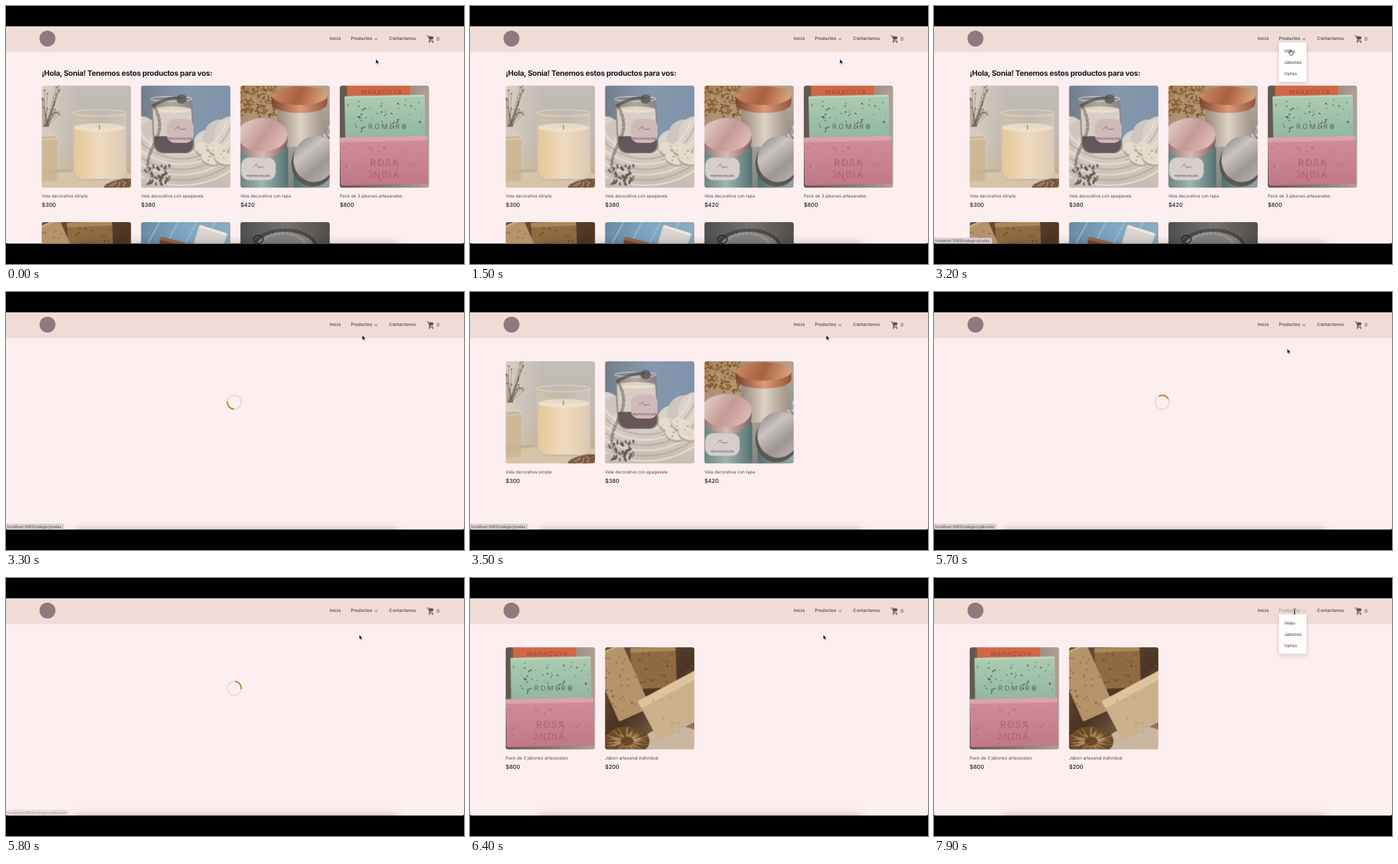
An HTML page with a canvas that plays this animation: 690x388 px, repeating every 8000 ms.

```html
<!DOCTYPE html>
<html lang="es">
<head>
<meta charset="utf-8">
<title>Tienda artesanal</title>
<style>
html, body { margin: 0; width: 100%; height: 100%; overflow: hidden; background: #000; }
canvas { display: block; width: 690px; height: 388px; }
</style>
</head>
<body>
<canvas id="stage"></canvas>
<script>
const W = 690, H = 388, LOOP = 8000, STEP = 100, TAU = Math.PI * 2;
const TOP = 30.6, BOTTOM = 357.5;
const CARD_W = 134.5, CARD_H = 153.5, PAD = 4;
const dpr = window.devicePixelRatio || 1;
const stage = document.getElementById('stage');
let c = context(stage, W, H);

function context(canvas, w, h) {
  canvas.width = Math.ceil(w * dpr);
  canvas.height = Math.ceil(h * dpr);
  const ctx = canvas.getContext('2d');
  ctx.scale(dpr, dpr);
  ctx.textRendering = 'geometricPrecision';
  return ctx;
}

// Drawing helpers
function rect(x, y, w, h, fill, r = 0) {
  c.fillStyle = fill;
  c.beginPath();
  c.roundRect(x, y, w, h, r);
  c.fill();
}
function oval(x, y, rx, ry, fill, rot = 0) {
  c.fillStyle = fill;
  c.beginPath();
  c.ellipse(x, y, rx, ry, rot, 0, TAU);
  c.fill();
}
function ring(x, y, rx, ry, color, width, from = 0, to = TAU) {
  c.strokeStyle = color;
  c.lineWidth = width;
  c.beginPath();
  c.ellipse(x, y, rx, ry, 0, from, to);
  c.stroke();
}
function line(color, width, ...pts) {
  c.beginPath();
  for (let i = 0; i < pts.length; i += 2) c.lineTo(pts[i], pts[i + 1]);
  c.strokeStyle = color;
  c.lineWidth = width;
  c.stroke();
}
function fade(x0, y0, x1, y1, ...colors) {
  const g = c.createLinearGradient(x0, y0, x1, y1);
  colors.forEach((col, i) => g.addColorStop(i / (colors.length - 1), col));
  return g;
}
const across = (x, w, ...colors) => fade(x, 0, x + w, 0, ...colors);
const down = (y, h, ...colors) => fade(0, y, 0, y + h, ...colors);

function text(s, x, y, size, weight, color, spacing = 0, align = 'left') {
  c.font = `${weight} ${size}px Inter, "Open Sans", sans-serif`;
  c.letterSpacing = spacing + 'px';
  c.textAlign = align;
  c.fillStyle = color;
  c.fillText(s, x, y);
}
function random(seed) {
  return () => (seed = (seed * 16807) % 2147483647) / 2147483647;
}
function specks(seed, n, x, y, w, h, color, size) {
  const r = random(seed);
  for (let i = 0; i < n; i++) {
    oval(x + r() * w, y + r() * h, size * (0.4 + r()), size * (0.3 + r() * 0.5), color, r() * 3);
  }
}

// Parts of the product pictures
function backdrop(fill) {
  rect(-PAD, -PAD, CARD_W + 2 * PAD, CARD_H + 2 * PAD, fill);
}
function slab(x, y, w, h, rot, front, edge, depth) {
  c.save();
  c.translate(x, y);
  c.rotate(rot);
  rect(0, 0, w, h, front, 3);
  rect(0, 0, w, depth, edge, 2);
  c.restore();
}
function glass(x, y, w, h, level, air, wax) {
  rect(x, y, w, h, air, [2, 2, 14, 14]);
  rect(x + 2, y + level, w - 4, h - level - 3, wax, [2, 2, 13, 13]);
  oval(x + w / 2, y + level, w / 2 - 2, w * 0.08, 'rgba(240,228,210,.75)');
  ring(x + w / 2, y, w / 2, w * 0.06, '#e2dcd3', 1);
}
function lid(x, y, rx, ry, depth, rim, face) {
  oval(x, y + depth, rx, ry, rim);
  rect(x - rx, y, rx * 2, depth, rim);
  oval(x, y, rx, ry, face);
}
function label(x, y, w, h, color) {
  rect(x - w / 2, y - h / 2, w, h, color, 12);
  line('#6f6068', 0.8, x - 8, y - 2, x - 3, y - 7, x, y - 2, x + 8, y - 3);
  text('FRUTOS ROJOS', x, y + h / 2 - 5, 4, 700, '#5c4b53', 0.4, 'center');
}
function chain(color, n, place) {
  for (let i = 0; i <= n; i++) {
    const [x, y] = place(i / n);
    ring(x, y, i % 2 ? 1.4 : 2.2, i % 2 ? 2.2 : 1.5, color, 0.9);
  }
}

function candle() {
  backdrop(down(0, CARD_H, '#c3bdb8', '#c2b9b0', '#c4ab8d'));
  rect(-PAD, -PAD, 60, 130, across(0, 56, 'rgba(221,212,198,.8)', 'rgba(221,212,198,0)'));
  oval(75, 148, 95, 20, '#d6c4aa');
  const r = random(41);
  for (let i = 0; i < 22; i++) {
    const x = r() * 27, y = r() * 48;
    line('rgba(91,76,58,.6)', 0.7, 2 + i * 0.4, 62, x, y);
    oval(x, y, 1.7, 0.9, '#75644e', r() * 3);
  }
  rect(-5, 76, 28, 68, 'rgba(203,180,143,.8)', 5);
  ring(9, 77, 14, 4, '#e7dccb', 0.8);
  glass(47, 41, 81, 102, 22, across(47, 81, '#cfc1ae', '#c3b9ae', '#cfc5ba'),
    across(47, 81, '#e5c797', '#eedbbf', '#dcc9b2'));
  line('#675242', 0.9, 87, 66, 87, 59);
  oval(118, 149, 25, 8, '#735440', -0.2);
  specks(7, 34, 96, 142, 40, 13, '#a47d5d', 2.2);
}

function jar() {
  backdrop(across(0, CARD_W, '#737f8b', '#8698ad', '#8093ab'));
  for (let i = 0; i < 9; i++) oval(i * 17, 98 - 22 * Math.cos(i * 0.8), 26, 30, i % 2 ? '#cfc7bf' : '#d9d2c9');
  rect(-PAD, 98, CARD_W + 2 * PAD, 60, down(98, 55, '#d6cec5', '#c8bdb1'));
  for (let i = 0; i < 7; i++) {
    ring(60, 40, 70 + i * 9, 62 + i * 8, i % 2 ? 'rgba(168,156,147,.5)' : 'rgba(237,230,221,.7)', 2.5, 0.2, 2.9);
  }
  c.save();
  c.transform(1, 0, 0.05, 1, 0, 0);
  glass(14, 20, 62, 82, 16, across(14, 62, '#8b8885', '#b0a8a2', '#878186'), '#d8cdc3');
  rect(16, 76, 58, 25, '#66585a', [0, 0, 14, 14]);
  c.restore();
  label(59, 68, 40, 36, '#cfbab9');
  oval(61, 20, 8, 7, '#68635f');
  chain('#4f4b49', 18, t => [58 - 40 * t, 18 + 12 * t * t]);
  chain('#595350', 26, t => [19 + 9 * Math.sin(t * 5), 29 + 96 * t]);
  for (let i = 0; i < 4; i++) {
    const x = 95 + i * 10, y = 95 + 14 * (i % 2);
    oval(x, y + 2, 16, 10, '#b7a997', 0.3);
    oval(x, y, 15, 9, '#e6dccd', 0.3);
  }
  specks(18, 16, 86, 88, 43, 26, '#9f8c73', 1.2);
  specks(25, 44, 7, 120, 40, 28, '#665e58', 2.8);
  specks(13, 22, 7, 120, 39, 28, '#c5bbad', 1.8);
}

function lids() {
  backdrop(fade(0, 0, CARD_W, CARD_H, '#a3845f', '#b3a69b', '#5c7475'));
  specks(31, 160, -3, -3, 56, 50, '#855b31', 2.6);
  specks(77, 160, -3, -3, 55, 48, '#bf9560', 1.8);
  specks(55, 70, 85, 60, 50, 40, '#d2c9c0', 2.4);
  rect(55, 30, 70, 62, across(55, 70, '#97897c', '#ddd2c5', '#a5958b'), 12);
  lid(89, 15, 42, 14, 12, across(48, 84, '#7d472f', '#dc9b77', '#8f5439'),
    fade(50, 0, 128, 28, '#c88a68', '#a8623f', '#e0a682'));
  rect(-8, 85, 80, 75, across(-8, 80, '#5f7b77', '#a3b5af', '#547471'), 12);
  label(27, 125, 52, 34, '#d5cecb');
  lid(33, 74, 38, 25, 10, across(-5, 76, '#8c6a6a', '#d9bab3', '#7f6261'),
    fade(0, 50, 70, 98, '#e6cfcb', '#c49b97', '#e4c4bd'));
  rect(80, 120, 62, 40, across(80, 55, '#54706f', '#98a9a7'), 12);
  oval(110, 116, 33, 36, '#5c5654', 0.25);
  oval(112, 110, 32, 35, fade(84, 78, 136, 142, '#8b8685', '#cbc4c1', '#9c9695', '#bdb5b2'), 0.25);
}

function pack() {
  backdrop(across(0, CARD_W, '#62574f', '#85786f', '#b09f95'));
  slab(11, -6, 95, 26, 0.01, '#cf6847', '#cf6847', 5);
  text('MARACUYA', 63, 13, 9.5, 400, '#a6452c', 1.1, 'center');
  slab(7, 16, 121, 70, -0.02, down(0, 65, '#abccb2', '#93b7a0'), '#bcd6c1', 3);
  specks(9, 44, 12, 20, 114, 50, '#55564a', 1.5);
  text('ROMERO', 73, 64.5, 10.5, 400, '#596a59', 2.5, 'center');
  slab(0, 78, 132, 72, -0.02, down(0, 72, '#d18d9b', '#c27987'), '#dba3ad', 7);
  specks(62, 20, 6, 84, 120, 58, '#a05c6c', 1.3);
  text('ROSA', 68, 121, 14, 300, '#a5566a', 1.8, 'center');
  text('INDIA', 68, 139, 13.5, 300, '#a5566a', 1.8, 'center');
}

function bars() {
  backdrop(fade(0, 0, CARD_W, CARD_H, '#705038', '#4c3525', '#a68d73'));
  oval(105, 148, 50, 30, '#c8b6a0');
  slab(38, 1, 68, 62, -0.04, '#8f6a42', '#ad8656', 7);
  specks(19, 32, 43, 9, 60, 49, '#5e4228', 1.4);
  slab(-22, 15, 52, 106, -0.42, '#b5946c', '#c8a980', 3);
  specks(84, 30, 0, 12, 46, 85, '#7e5e3c', 1.6);
  slab(49, 81, 110, 68, -0.49, '#cbb08c', '#ddc49f', 12);
  specks(16, 17, 72, 72, 58, 55, '#a88860', 1.3);
  oval(33, 141, 34, 22, '#694a27');
  const r = random(99);
  for (let i = 0; i < 90; i++) {
    const a = r() * TAU, d = 14 + r() * 20, x = Math.cos(a), y = Math.sin(a) * 0.68;
    line(i % 2 ? '#a98553' : '#d0ac74', 0.7, 33 + 10 * x, 141 + 10 * y, 33 + d * x, 141 + d * y);
  }
}

function cloth() {
  backdrop(across(0, CARD_W, '#6a8ba3', '#7fa6c2', '#8eabc0'));
  for (let i = 0; i < 5; i++) line('rgba(175,200,217,.6)', 2, i * 28, 0, i * 28 - 22, 40);
  slab(88, 4, 44, 50, 0.3, '#d9d3cd', '#ebe6e0', 4);
  slab(30, 22, 40, 40, 0.25, '#77452f', '#9c6647', 5);
}

function bracelet() {
  backdrop(across(0, CARD_W, '#504f4e', '#747270', '#544d4a'));
  oval(67, 42, 47, 27, '#82807e');
  chain('#2b2b2b', 34, t => [67 - 47 * Math.cos(t * Math.PI), 39 - 27 * Math.sin(t * Math.PI)]);
  chain('#adaca9', 18, t => [64 - 35 * Math.cos(t * Math.PI), 38 - 21 * Math.sin(t * Math.PI)]);
  ring(27, 26, 7, 6, '#2d2e2e', 2);
}

// Pictures are painted once, then placed slightly softened
const sprites = new Map();
function sprite(draw) {
  if (!sprites.has(draw)) {
    const canvas = document.createElement('canvas'), outer = c;
    c = context(canvas, CARD_W + 2 * PAD, CARD_H + 2 * PAD);
    c.translate(PAD, PAD);
    draw();
    c = outer;
    sprites.set(draw, canvas);
  }
  return sprites.get(draw);
}
function picture(draw, x, y) {
  const img = sprite(draw);
  c.save();
  c.beginPath();
  c.roundRect(x, y, CARD_W, CARD_H, 3.5);
  c.clip();
  c.filter = 'blur(0.6px)';
  c.drawImage(img, x - PAD, y - PAD, img.width / dpr, img.height / dpr);
  c.restore();
}

const column = i => 53.8 + i * 149.7;
const candles = [
  [candle, 'Vela decorativa simple', '$300'],
  [jar, 'Vela decorativa con apagavela', '$380'],
  [lids, 'Vela decorativa con tapa', '$420']
];
const soaps = [
  [pack, 'Pack de 3 jabones artesanales', '$800'],
  [bars, 'Jabon artesanal individual', '$200']
];
function cards(list, y) {
  list.forEach(([draw, name, price], i) => {
    picture(draw, column(i), y);
    text(name, column(i), y + 168.4, 6.5, 400, '#4d484d');
    text(price, column(i), y + 182.4, 8.4, 500, '#211d24');
  });
}

// Each visit to the menu, from hovering the link to the loaded page
const VISITS = [
  { open: 2400, item: 2800, url: 3100, click: 3300, ready: 3500, gone: 3700, name: 'velas', list: candles },
  { open: 4600, item: 5200, url: 5400, click: 5600, ready: 6000, gone: 5900, name: 'jabones', list: soaps },
  { open: 7600, item: LOOP, click: LOOP }
];
const MOVES = [
  { from: 2000, to: 2500, x: 540, y: 51 },
  { from: 2500, to: 2900, x: 536.8, y: 65.2 },
  { from: 4400, to: 4700, x: 534.6, y: 51 },
  { from: 5000, to: 5500, x: 532.3, y: 85.5 },
  { from: 7200, to: 7800, x: 543.2, y: 50.5 }
];
const during = (t, from, to) => t >= from && t < to;

function cursorAt(t) {
  let x = 557.3, y = 80;
  for (const m of MOVES) {
    const u = Math.min(1, Math.max(0, (t - m.from) / (m.to - m.from)));
    const e = u * u * (3 - 2 * u);
    x += (m.x - x) * e;
    y += (m.y - y) * e;
  }
  return [x, y];
}

function header(hover) {
  const ink = '#433d42', link = hover ? '#a0918f' : ink, steel = '#5d5354';
  rect(0, TOP, W, 69.5 - TOP, '#f0dcd6');
  oval(62.5, 49, 12, 12, '#8f7a80');
  text('Inicio', 487.6, 51.4, 6.6, 500, ink);
  text('Productos', 519.7, 51.4, 6.6, 500, link);
  line(link, 1, 555.3, 48.7, 557.3, 50.7, 559.3, 48.7);
  text('Contactenos', 577.3, 51.4, 6.6, 500, ink);
  line(steel, 1.1, 634, 45, 636, 45, 638.7, 50.6, 637.4, 52.6, 643.6, 52.6);
  slab(636.6, 45.8, 7.2, 4.8, 0, steel, steel, 1);
  for (const x of [638, 642.8]) oval(x, 54.4, 1, 1, steel);
  text('0', 648.5, 52.3, 7.2, 400, ink);
}

function spinner(t) {
  const a = -1.48 + (t - 5800) / 1000 * TAU;
  ring(344, 165.8, 10.4, 10.4, '#e4dee0', 2.1);
  ring(344, 165.8, 10.4, 10.4, '#c78424', 2.1, a, a + 1.6);
}

function home() {
  text('¡Hola, Sonia! Tenemos estos productos para vos:', 53.8, 104.6, 11.35, 700, '#1f1a20', -0.28);
  cards([...candles, soaps[0]], 119.8);
  [bars, cloth, bracelet].forEach((draw, i) => picture(draw, column(i), 325));
}

function menu() {
  c.save();
  c.shadowColor = 'rgba(70,40,40,.22)';
  c.shadowBlur = 6 * dpr;
  c.shadowOffsetY = 2 * dpr;
  rect(519.7, 54.5, 41.6, 59.5, '#fffdfc', 1);
  c.restore();
  ['Velas', 'Jabones', 'Varios'].forEach((s, i) => text(s, 527.6, 69.8 + i * 17.2, 6.5, 400, '#373238'));
}

function status(t, visit) {
  const url = 'localhost:3000/category/' + visit.name;
  c.globalAlpha = t >= visit.gone - STEP ? 0.5 : 1;
  c.font = '400 5.67px Inter, "Open Sans", sans-serif';
  c.letterSpacing = '0px';
  rect(0, 348.4, c.measureText(url).width + 6, 9.1, '#d8ced0', [0, 2, 0, 0]);
  text(url, 2, 355.3, 5.67, 400, '#50484c');
  c.globalAlpha = 1;
}

function dockShadow() {
  c.save();
  c.shadowColor = 'rgba(0,0,0,.3)';
  c.shadowBlur = 14 * dpr;
  rect(104, 358, 486, 20, '#000', 5);
  c.restore();
}

const ARROW = new Path2D('M0 0V6.8L1.6 5.4 2.7 7.9 3.8 7.4 2.8 5 4.9 4.9Z');
const HAND = new Path2D('M-.8.6H.3L.8 3.2 4 4 4.2 6 3 8.7H0L-2.3 5.3-1.7 4.6-.4 5.4Z');
const BEAM = new Path2D('M-1.6-4L0-3.3 1.6-4M0-3.3V3.3M-1.6 4L0 3.3 1.6 4M-1.2.8H1.2');

function cursor(t, shape) {
  c.save();
  c.translate(...cursorAt(t));
  c.fillStyle = shape === HAND ? '#fff' : '#0b0b0b';
  c.strokeStyle = shape === ARROW ? 'rgba(255,255,255,.8)' : '#1c191b';
  c.lineWidth = shape === ARROW ? 0.4 : 0.8;
  if (shape !== BEAM) c.fill(shape);
  c.stroke(shape);
  c.restore();
}

function render(t) {
  const visit = VISITS.findLast(v => t >= v.open);
  const page = VISITS.findLast(v => t >= v.click);
  const hover = visit && during(t, visit.open, visit.item);
  const pointing = visit && during(t, visit.item, visit.click);

  rect(0, 0, W, H, '#000');
  c.save();
  c.beginPath();
  c.roundRect(0, TOP, W, BOTTOM - TOP, [0, 0, 3, 3]);
  c.clip();
  rect(0, TOP, W, BOTTOM - TOP, '#fdeeef');
  header(hover);
  if (!page) home();
  else if (t < page.ready) spinner(t);
  else cards(page.list, 104.3);
  dockShadow();
  if (visit && during(t, visit.open + STEP, visit.click)) menu();
  if (visit && during(t, visit.url, visit.gone)) status(t, visit);
  cursor(t, hover ? BEAM : pointing ? HAND : ARROW);
  c.restore();
}

let last = -1;
const start = performance.now();
function tick() {
  const t = Math.floor((performance.now() - start) % LOOP / STEP) * STEP;
  if (t !== last) render(last = t);
  requestAnimationFrame(tick);
}
tick();
</script>
</body>
</html>
```
